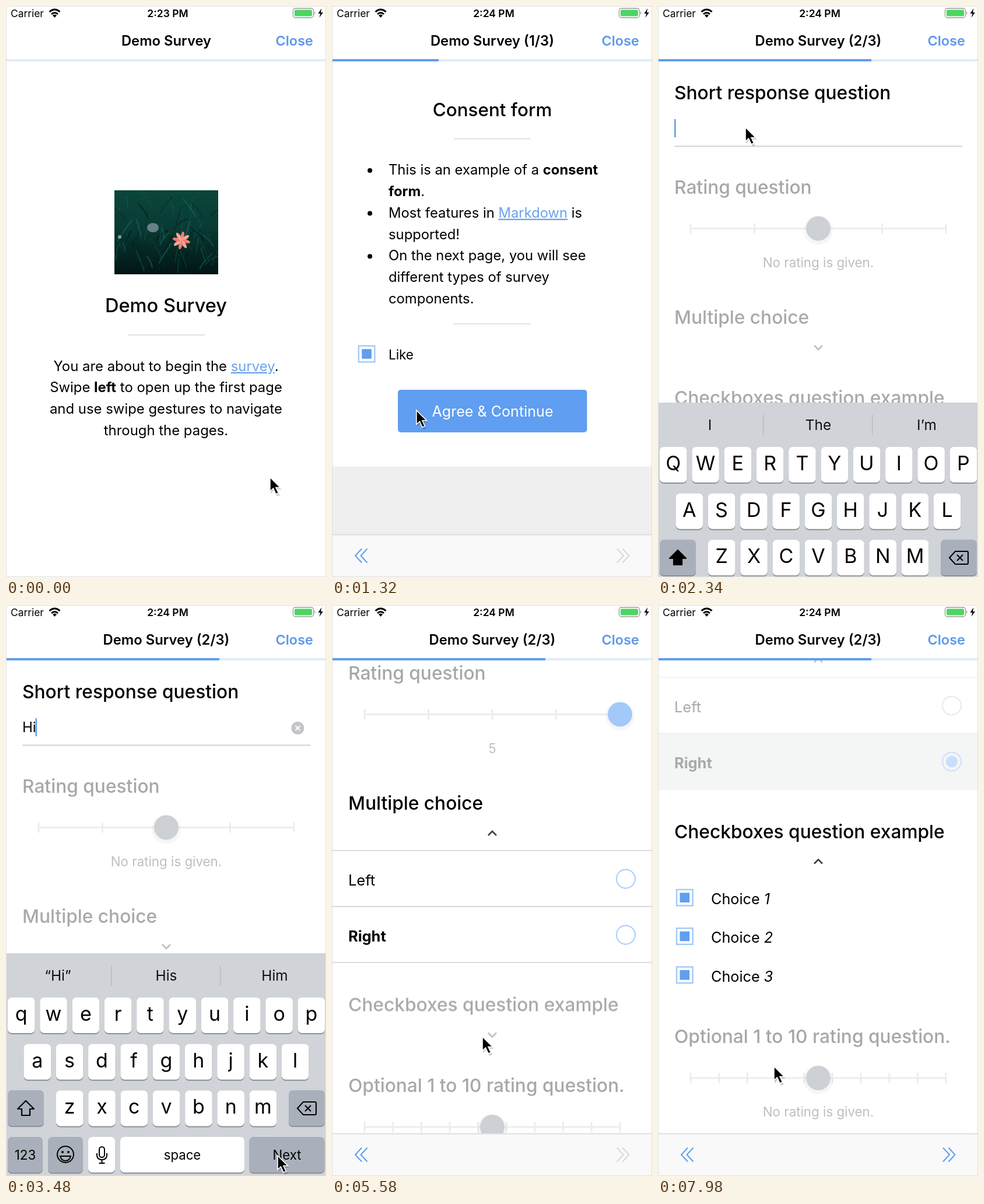
An HTML page that plays this animation: 549x979 px, repeating every 8000 ms.

```html
<!DOCTYPE html>
<html lang="en">
<head>
<meta charset="utf-8">
<title>Demo Survey</title>
<style>
  html, body { margin: 0; width: 100%; height: 100%; overflow: hidden; background: #fff; }
  svg { display: block; width: 100vw; height: 100vh; }
  text { font-family: Inter, Roboto, sans-serif; font-optical-sizing: none; white-space: pre; }
  .b { font-weight: 700; }
  .i { font-style: italic; }
  .link { fill: #6ba2ec; text-decoration: underline; text-decoration-thickness: 1.5px; text-underline-offset: 3px; }
</style>
</head>
<body>
<svg id="stage" viewBox="0 0 549 979"></svg>
<script>
const W = 549, LOOP = 8000, STEP = 60;
const BLUE = '#5f9ef0', PALE = '#a2c9f8', GREY = '#d8d8d8', PANEL = '#efefef', DIM = 0.34;
const $ = id => document.getElementById(id);

// ---- drawing helpers; text is centred vertically on its capitals ----
const text = (x, y, s, size, { fill = '#000', weight = 400, anchor = 'start', id = '' } = {}) =>
  `<text x="${x}" y="${y + size * 0.364}" font-size="${size}" fill="${fill}" font-weight="${weight}" text-anchor="${anchor}"${id && ` id="${id}"`}>${s}</text>`;
const mid = (x, y, s, size, opts) => text(x, y, s, size, { anchor: 'middle', ...opts });
const rect = (x, y, w, h, fill, extra = '') =>
  `<rect x="${x}" y="${y}" width="${w}" height="${h}" fill="${fill}" ${extra}/>`;
const stroke = (d, color, width = 2, extra = '') =>
  `<path d="${d}" fill="none" stroke="${color}" stroke-width="${width}" ${extra}/>`;
const group = (id, body, extra = '') => `<g id="${id}" ${extra}>${body}</g>`;
const rule = y => rect(209, y - 1, 132, 2, '#e2e2e2');
const heading = (y, s) => text(28, y, s, 31.7, { weight: 500 });
const chevron = (id, y) =>
  `<g transform="translate(275 ${y})">${stroke('M-7-3.5 0 3.5 7-3.5', '#444', 2.8, `id="${id}"`)}</g>`;
const checkbox = (id, x, y) =>
  rect(x - 13.8, y - 13.8, 27.6, 27.6, '#fff', `stroke="${GREY}" stroke-width="2.4" id="${id}"`) +
  rect(x - 8.3, y - 8.3, 16.6, 16.6, BLUE, `id="${id}Dot"`);

function slider(id, y, count) {
  let d = `M56 ${y}H494`;
  for (let i = 0; i < count; i++) d += `M${56 + 438 * i / (count - 1)} ${y - 9}v18`;
  return stroke(d, '#cfcfcf', 3, `id="${id}Line"`) +
    `<g id="${id}Knob" fill="#cdd0d4"><circle cx="275" cy="${y + 3}" r="25" fill="#000" opacity=".035"/>` +
    `<circle cx="275" cy="${y}" r="21"/></g>`;
}

function random(seed) {
  return () => (seed = seed * 16807 % 2147483647) / 2147483647;
}

function photo() {
  const rnd = random(77);
  const tones = ['#0a5145', '#0d3d35', '#031d1d', '#146051', '#052927'];
  let s = rect(186, 316, 178, 144, 'url(#meadow)');
  for (let i = 0; i < 90; i++) {
    const x = 186 + 178 * rnd(), y = 345 + 115 * rnd(), lean = 50 * rnd() - 25;
    s += stroke(`M${x} ${y}q${lean / 4}-12 ${lean}-${12 + 24 * rnd()}`, tones[i % 5], 1 + rnd() * 1.6, 'opacity=".7"');
  }
  s += '<ellipse cx="252" cy="380" rx="10" ry="8" fill="#68808a"/><circle cx="195" cy="396" r="3" fill="#83a39b"/>';
  for (let a = 0; a < 360; a += 45)
    s += `<ellipse cx="301" cy="394.5" rx="3" ry="8" fill="${a % 90 ? '#f6a596' : '#ef7d74'}" transform="rotate(${a + 12} 301 402)"/>`;
  return `<g clip-path="url(#photoClip)">${s}</g>`;
}

const intro = rect(0, 95, W, 884, '#fff') + photo() +
  mid(274.5, 513, 'Demo Survey', 32.6, { weight: 500 }) + rule(564) +
  ['You are about to begin the <tspan class="link">survey</tspan>.',
   'Swipe <tspan class="b">left</tspan> to open up the first page',
   'and use swipe gestures to navigate', 'through the pages.']
    .map((s, i) => mid(274.5, 617 + 36.8 * i, s, 23.9)).join('');

const consentBody = rect(0, 95, W, 694.5, '#fff') +
  mid(275, 178, 'Consent form', 31.4, { weight: 500 }) + rule(227.5) +
  ['This is an example of a <tspan class="b">consent</tspan>', '<tspan class="b">form</tspan>.',
   'Most features in <tspan class="link">Markdown</tspan> is', 'supported!',
   'On the next page, you will see', 'different types of survey', 'components.']
    .map((s, i) => text(97, 280.5 + 36.8 * i, s, 23.8)).join('') +
  [0, 2, 4].map(i => `<circle cx="65" cy="${282 + 36.8 * i}" r="4"/>`).join('') + rule(545) +
  checkbox('like', 59.5, 596.5) + text(97, 598, 'Like', 22.4) +
  rect(113, 658, 324.5, 73, PALE, 'rx="5" id="agree"') +
  mid(275.5, 695, 'Agree &amp; Continue', 25.1, { fill: '#fff' });

const loading = mid(276, 529, 'Loading content...', 25.2, { fill: '#858585' });

const optionRow = (i, label, weight) => {
  const y = 615 + 96 * i;
  return rect(0, y, W, 96, '#dfe2e2', `id="row${i}"`) + text(28, y + 51, label, 25.4, { weight }) +
    `<circle cx="504" cy="${y + 48.5}" r="16" fill="none" stroke="${PALE}" stroke-width="1.8" id="ring${i}"/>` +
    `<circle cx="504" cy="${y + 48.5}" r="10" fill="${BLUE}" id="dot${i}"/>` +
    rect(0, y - 0.8, W, 1.6, '#d6d6d6') + rect(0, y + 95.2, W, 1.6, '#d6d6d6');
};

const questions = [
  heading(148.5, 'Short response question') + text(28, 209.5, '', 24, { id: 'answer' }) +
    rect(28, 239.5, 494, 2, '#d2d2d2') + rect(28, 194, 2.6, 31, BLUE, 'id="caret"') +
    group('clear', `<circle cx="500.5" cy="211" r="11" fill="#c2c4c8"/>${stroke('m496.5 207 8 8m0-8-8 8', '#fff', 2)}`),
  heading(310.5, 'Rating question') + mid(275, 439.5, '', 22.3, { id: 'rating', fill: '#444' }),
  heading(533.5, 'Multiple choice') + chevron('chev2', 585.5) +
    group('options', optionRow(0, 'Left', 400) + optionRow(1, 'Right', 700)),
  heading(671.5, 'Checkboxes question example') + chevron('chev3', 723.5) +
    group('choices', [1, 2, 3].map(n => checkbox('box' + n, 45.8, 718.9 + 66.3 * n) +
      text(91, 721 + 66.3 * n, `Choice <tspan class="i">${n}</tspan>`, 25.2)).join('')),
  heading(810, 'Optional 1 to 10 rating question.') +
    mid(275, 939, 'No rating is given.', 22.3, { fill: '#444' })
];

const formBody = rect(0, 95, W, 884, '#fff') + group('scroll',
  questions.map((q, i) => group('q' + i, q)).join('') +
  slider('rate', 381.5, 5) + group('last', slider('ten', 881.5, 10)));

// ---- keyboard ----
function key(x, y, w, label, size, dark) {
  return rect(x, y + 2, w, 61, '#8d9096', 'rx="7"') + rect(x, y, w, 61, dark ? '#a9b0bb' : '#fff', 'rx="7"') +
    (label ? mid(x + w / 2, y + 31, label, size) : '');
}
function keyboard() {
  let s = rect(0, 597, W, 382, '#d0d3d7') + rect(180, 618, 1.5, 35, '#b8bbc0') + rect(367, 618, 1.5, 35, '#b8bbc0');
  s += [89, 275, 461].map((x, i) => mid(x, 635.5, '', 24.4, { id: 'hint' + i, fill: '#111' })).join('');
  ['qwertyuiop', 'asdfghjkl', 'zxcvbnm'].forEach((row, r) => {
    [...row].forEach((c, i) => {
      const x = [3, 30.5, 86][r] + 55.3 * i, y = 673 + 79.7 * r;
      s += key(x, y, 46.5) + `<text class="letter" x="${x + 23.2}" y="${y + 40}" font-size="34" text-anchor="middle">${c}</text>`;
    });
  });
  s += key(3, 832, 62, '', 0, 1) + stroke('M34 850 20 864h7v11h14v-11h7Z', '#000', 2.2, 'stroke-linejoin="round" id="shift"') +
    key(485, 832, 62, '', 0, 1) + stroke('M500 863l10-11h20q2 0 2 2v18q0 2-2 2h-20Zm13-5 10 10m0-10-10 10', '#000', 2.1) +
    key(3, 912, 60, '123', 22.3, 1) + key(72, 912, 60, '', 0, 1) +
    '<circle cx="102" cy="942" r="14" fill="none" stroke="#000" stroke-width="2"/><circle cx="97" cy="938" r="2"/><circle cx="107" cy="938" r="2"/>' +
    stroke('M93 945h18q-2 8-9 8t-9-8Z', '#000', 2) +
    key(141, 912, 46) + '<rect x="160" y="929" width="9" height="18" rx="4.5" fill="none" stroke="#000" stroke-width="2"/>' +
    stroke('M156 940v3q0 8 8.5 8t8.5-8v-3M164.5 951v6m-5 0h10', '#000', 2) +
    key(196, 912, 213, 'space', 22.2) + key(417.5, 912, 129, 'Next', 22.3, 1);
  return s;
}

const navBar = rect(0, 906, W, 73, '#f9f9f9') + rect(0, 905.5, W, 2, '#dedede') +
  stroke('M51 930.5 40 942.5 51 954.5M60.5 930.5 49.5 942.5 60.5 954.5', BLUE) +
  stroke('M489 930.5 500 942.5 489 954.5M498.5 930.5 509.5 942.5 498.5 954.5', GREY, 2, 'id="forward"');

const header = rect(0, 0, W, 92, '#fff') + rect(0, 91, W, 4, '#e2ecfa') + rect(0, 91, 0, 4, BLUE, 'id="progress"') +
  text(8, 12.5, 'Carrier', 17.4) + mid(277.5, 12.5, '', 17.5, { weight: 600, id: 'clock' }) +
  stroke('M74.5 10q9-8 18 0M78 14q5.5-5 11 0', '#000', 2.9) + '<path d="M83.5 20l-3.5-4q3.5-3 7 0Z"/>' +
  '<rect x="492.5" y="4" width="35" height="16" rx="4" fill="#fff" stroke="#999" stroke-width="1.3"/>' +
  rect(495, 6.5, 30, 11, '#4cd562', 'rx="2"') + '<path d="M529 9q3 3 0 6Z" fill="#999"/><path d="M541.5 4l-6 9h4l-2 7 6.5-9h-4Z"/>' +
  mid(275, 59.5, '', 23.8, { weight: 600, id: 'title' }) +
  text(527, 59.5, 'Close', 23.5, { weight: 600, anchor: 'end', fill: '#5c99ee' });

$('stage').innerHTML =
  `<defs><linearGradient id="meadow" x2="0" y2="1"><stop stop-color="#0b463b"/><stop offset=".45" stop-color="#083a33"/><stop offset="1" stop-color="#021416"/></linearGradient>
   <clipPath id="photoClip">${rect(186, 316, 178, 144, '#000')}</clipPath></defs>` +
  rect(0, 0, W, 979, '#fff') + group('intro', intro) +
  group('consent', rect(0, 95, W, 884, PANEL) + group('wait1', loading) + group('consentBody', consentBody)) +
  group('form', rect(0, 95, W, 884, PANEL) + group('wait2', loading) + group('formBody', formBody)) +
  group('nav', navBar) + group('keys', keyboard()) + header +
  rect(0.5, 0.5, W - 1, 978, 'none', 'stroke="#dfdfdf"') +
  group('cursor', '<path d="M1 3v25l6-6 5 11 5-2-5-10h8Z" fill="#000" opacity=".18"/>' +
    '<path d="M0 0v24l5.5-5 4.5 10 4.5-2-4.5-9.5h7.5Z" stroke="#fff" stroke-width="1.6"/>');

// ---- motion ----
const ease = {
  linear: p => p,
  in: p => p * p,
  out: p => 1 - (1 - p) ** 3,
  both: p => p < 0.5 ? 2 * p * p : 1 - 2 * (1 - p) ** 2
};
// rows: [time, value, easing towards this value]
function track(t, rows) {
  const k = rows.findIndex(r => r[0] > t);
  if (k < 0) return rows[rows.length - 1][1];
  if (k === 0) return rows[0][1];
  const [t0, a] = rows[k - 1], [t1, b, e = 'both'] = rows[k];
  return a + (b - a) * ease[e]((t - t0) / (t1 - t0));
}
const ramp = (t, from, to, e) => track(t, [[from, 0], [to, 1, e]]);

const PATH = [
  [120, 453, 808], [420, 120, 808, 'in'], [780, 120, 808], [1020, 88, 597], [1140, 88, 597],
  [1380, 153, 707], [1860, 153, 707], [2100, 150, 208], [2460, 150, 208], [3240, 466, 944],
  [3660, 466, 944], [4200, 267, 390], [4560, 267, 390], [4920, 490, 390], [5040, 490, 390],
  [5520, 258, 740], [5640, 258, 740], [5940, 262, 566], [6240, 262, 566], [6720, 42, 503],
  [6960, 42, 503], [7140, 42, 569], [7320, 42, 569], [7500, 42, 636], [7740, 42, 636], [7980, 199, 791]
];
const TICKS = [7020, 7320, 7680];
const FOCUS = [-1e4, 3600, 5100, 6240, 1e5];

const set = (id, attrs) => { for (const k in attrs) $(id).setAttribute(k, attrs[k]); };
const move = (id, x, y) => set(id, { transform: `translate(${x} ${y})` });
const show = (id, opacity) => set(id, { opacity: +opacity });
const label = (id, s) => { if ($(id).textContent !== s) $(id).textContent = s; };
const tick = (id, on) => {
  show(id + 'Dot', on);
  set(id, { stroke: on ? PALE : GREY });
};

function draw(t) {
  const page = track(t, [[120, 0], [420, 333 / W, 'in'], [790, 1, 'out'], [1605, 1], [1905, 2]]);
  move('intro', -page * W, 0);
  move('consent', (1 - page) * W, 0);
  move('form', (2 - page) * W, 0);
  set('progress', { width: page * W / 3 });
  move('nav', 0, 73 * (1 - ramp(t, 240, 480, 'out')));
  label('clock', t < 900 ? '2:23 PM' : '2:24 PM');
  label('title', 'Demo Survey' + (t < 840 ? '' : t < 1920 ? ' (1/3)' : ' (2/3)'));

  const ready1 = ramp(t, 420, 660, 'linear'), ready2 = ramp(t, 1980, 2160, 'linear');
  show('consentBody', ready1);
  show('wait1', 1 - ready1);
  show('formBody', ready2);
  show('wait2', 1 - ready2);
  tick('like', t >= 1080);
  set('agree', { fill: t >= 1080 && t < 1500 ? BLUE : PALE });

  // focus moves from question to question, dimming the others
  const lit = questions.map((q, i) => i > 3 ? 0 : ramp(t, FOCUS[i], FOCUS[i] + 180) - ramp(t, FOCUS[i + 1], FOCUS[i + 1] + 180));
  lit.forEach((v, i) => show('q' + i, DIM + (1 - DIM) * v));

  const typed = t < 2760 ? '' : t < 3000 ? 'H' : 'Hi';
  const editing = t >= 2220 && t < 3600;
  label('answer', typed);
  set('caret', { x: 28 + [0, 17.5, 22.5][typed.length] });
  show('caret', editing && (t > 2700 || t % 1000 < 500));
  show('clear', editing && typed !== '');
  move('keys', 0, 384 * (1 - ramp(t, 2220, 2520, 'out') + ramp(t, 3600, 3840)));
  const upper = typed === '';
  document.querySelectorAll('.letter').forEach(el => {
    const c = el.textContent;
    el.textContent = upper ? c.toUpperCase() : c.toLowerCase();
  });
  set('shift', { fill: upper ? '#000' : 'none' });
  [['I', 'The', 'I’m'], ['“H”', 'He', 'Have'], ['“Hi”', 'His', 'Him']][typed.length]
    .forEach((s, i) => label('hint' + i, s));

  const rated = t >= 4320, slide = track(t, [[4560, 0], [4920, 219]]);
  move('rateKnob', slide, 0);
  set('rateKnob', { fill: !rated ? '#cdd0d4' : lit[1] > 0.5 ? BLUE : PALE });
  show('rateLine', 0.38 + 0.62 * lit[1]);
  show('tenLine', 0.38);
  label('rating', rated ? String(3 + Math.round(slide / 109.5)) : 'No rating is given.');

  const open2 = ramp(t, 5100, 5340), open3 = ramp(t, 6240, 6480);
  move('scroll', 0, -track(t, [[5100, 0], [5460, 194], [6240, 194], [6660, 491]]));
  move('q3', 0, 207.5 * open2);
  move('q4', 0, 207.5 * open2 + 213 * open3);
  move('last', 0, 207.5 * open2 + 213 * open3);
  show('options', open2);
  show('choices', open3);
  set('chev2', { transform: `scale(1 ${1 - 2 * open2})` });
  set('chev3', { transform: `scale(1 ${1 - 2 * open3})` });

  const picked = t >= 6060;
  show('row0', 0);
  show('dot0', 0);
  show('row1', picked);
  show('dot1', picked);
  set('ring0', { stroke: picked ? '#b4b8bc' : PALE });
  set('ring1', { stroke: picked ? BLUE : PALE });
  TICKS.forEach((at, i) => tick('box' + (i + 1), t >= at));
  set('forward', { stroke: t >= TICKS[0] ? BLUE : GREY });

  const along = axis => track(t, PATH.map(p => [p[0], p[axis], p[3]]));
  move('cursor', along(1), along(2));
}

const start = performance.now();
function frame() {
  const t = (performance.now() - start) % LOOP;
  draw(Math.floor(t / STEP) * STEP);
  requestAnimationFrame(frame);
}
frame();
</script>
</body>
</html>
```
